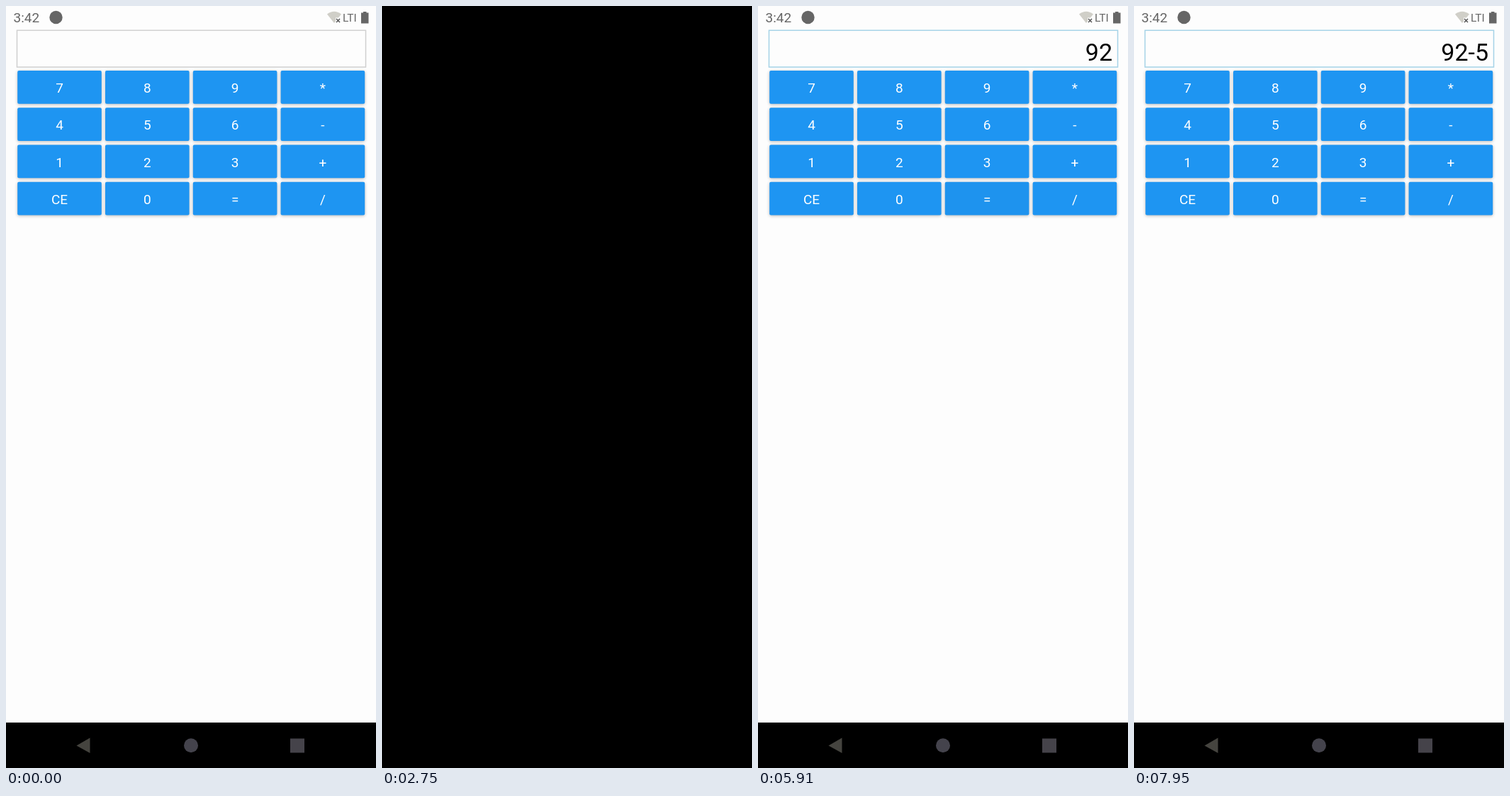
Write an HTML page with a canvas that moves like this. It is 522 by 1073 pixels and loops after 8000 ms.

```html
<!DOCTYPE html>
<html>
<head>
<meta charset="utf-8">
<title>Calculator</title>
<style>
html, body { margin: 0; width: 100%; height: 100%; overflow: hidden; background: #000; }
canvas { display: block; }
</style>
</head>
<body>
<canvas id="stage" width="522" height="1073"></canvas>
<script>
const ctx = document.getElementById("stage").getContext("2d");
const LOOP = 8000;
const KEYS = ["7", "8", "9", "*", "4", "5", "6", "-", "1", "2", "3", "+", "CE", "0", "=", "/"];

// Spans in which the screen blacks out, in ms.
const BLACKOUTS = [[1750, 2250], [2750, 3040], [3620, 4000], [4870, 5450], [5950, 6830]];

// Taps: key, touch time, length of the ripple, delay until the display shows the text.
const TAPS = [
  { key: "8", at: 2250, len: 500, delay: 150, text: "8" },
  { key: "9", at: 3040, len: 580, delay: 150, text: "89" },
  { key: "+", at: 4000, len: 500, delay: 150, text: "89+" },
  { key: "3", at: 4370, len: 500, delay: 150, text: "89+3" },
  { key: "=", at: 5450, len: 500, delay: 150, text: "92" },
  { key: "-", at: 6830, len: 640, delay: 150, text: "92-" },
  { key: "5", at: 7450, len: 500, delay: 230, text: "92-5" }
];

const clamp = v => Math.max(0, Math.min(1, v));
const mix = (a, b, p) => "rgb(" + a.map((v, i) => Math.round(v + (b[i] - v) * p)) + ")";

function text(str, x, y, size, color, align = "left") {
  ctx.font = size + "px Roboto, sans-serif";
  ctx.textAlign = align;
  ctx.fillStyle = color;
  ctx.fillText(str, x, y);
}

function rect(x, y, w, h, color) {
  ctx.fillStyle = color;
  ctx.fillRect(x, y, w, h);
}

function circle(x, y, r, color) {
  ctx.fillStyle = color;
  ctx.beginPath();
  ctx.arc(x, y, r, 0, 7);
  ctx.fill();
}

function statusBar() {
  const grey = "#666";
  text("3:42", 10.5, 23, 19, grey);
  circle(70.5, 16, 9.2, grey);

  ctx.fillStyle = "#d0cfc8";
  ctx.beginPath();
  ctx.moveTo(463, 24);
  ctx.lineTo(453, 11.5);
  ctx.quadraticCurveTo(463, 4, 473, 11.5);
  ctx.closePath();
  ctx.fill();

  rect(465, 16.5, 8, 8, "#fdfdfd");
  ctx.strokeStyle = "#555";
  ctx.lineWidth = 1.5;
  ctx.beginPath();
  ctx.moveTo(466, 18);
  ctx.lineTo(471, 23);
  ctx.moveTo(471, 18);
  ctx.lineTo(466, 23);
  ctx.stroke();

  text("LTI", 475, 21.8, 15.5, grey);
  rect(501, 9.5, 10.5, 15, grey);
  rect(504, 8, 4.5, 2, grey);
}

function navBar() {
  rect(0, 1009, 522, 64, "#000");
  ctx.fillStyle = "#45443f";
  ctx.beginPath();
  ctx.moveTo(99.5, 1041.5);
  ctx.lineTo(118.5, 1030.5);
  ctx.lineTo(118.5, 1052);
  ctx.fill();
  circle(261, 1041.3, 10, "#44434c");
  rect(401, 1031.5, 20, 20, "#45434a");
}

function display(t) {
  ctx.strokeStyle = mix([208, 208, 208], [165, 211, 231], clamp((t - 40) / 400));
  ctx.lineWidth = 1.5;
  ctx.strokeRect(15.5, 34.3, 492, 51.7);
  const last = TAPS.filter(tap => t >= tap.at + tap.delay).pop();
  if (last) text(last.text, 500, 77, 34, "#000", "right");
}

function button(key, i, t) {
  const x = 16.2 + (i % 4) * 123.8;
  const y = 91 + Math.floor(i / 4) * 52.25;
  const w = 118.6, h = 46.8;
  const tap = TAPS.find(p => p.key === key && t >= p.at && t < p.at + p.len);
  const p = tap ? (t - tap.at) / tap.len : 0;

  ctx.save();
  ctx.shadowColor = "rgba(0,0,0,.28)";
  ctx.shadowBlur = 4 + 3 * Math.sin(Math.PI * p);
  ctx.shadowOffsetY = 1;
  ctx.fillStyle = "#1e95f2";
  ctx.beginPath();
  ctx.roundRect(x, y, w, h, 2);
  ctx.fill();
  ctx.restore();

  if (tap) {
    ctx.save();
    ctx.clip();
    const fade = 1 - clamp((p - 0.4) / 0.6);
    circle(x + w / 2, y + h / 2, 66 * clamp(p / 0.45), `rgba(0,0,0,${0.12 * fade})`);
    ctx.restore();
  }
  text(key, x + w / 2, y + 31, 19, "#fff", "center");
}

function draw(t) {
  rect(0, 0, 522, 1073, "#000");
  if (BLACKOUTS.some(([from, to]) => t >= from && t < to)) return;
  rect(0, 0, 522, 1009, "#fdfdfd");
  statusBar();
  display(t);
  KEYS.forEach((key, i) => button(key, i, t));
  navBar();
}

function frame() {
  draw(performance.now() % LOOP);
  requestAnimationFrame(frame);
}
frame();
</script>
</body>
</html>
```
